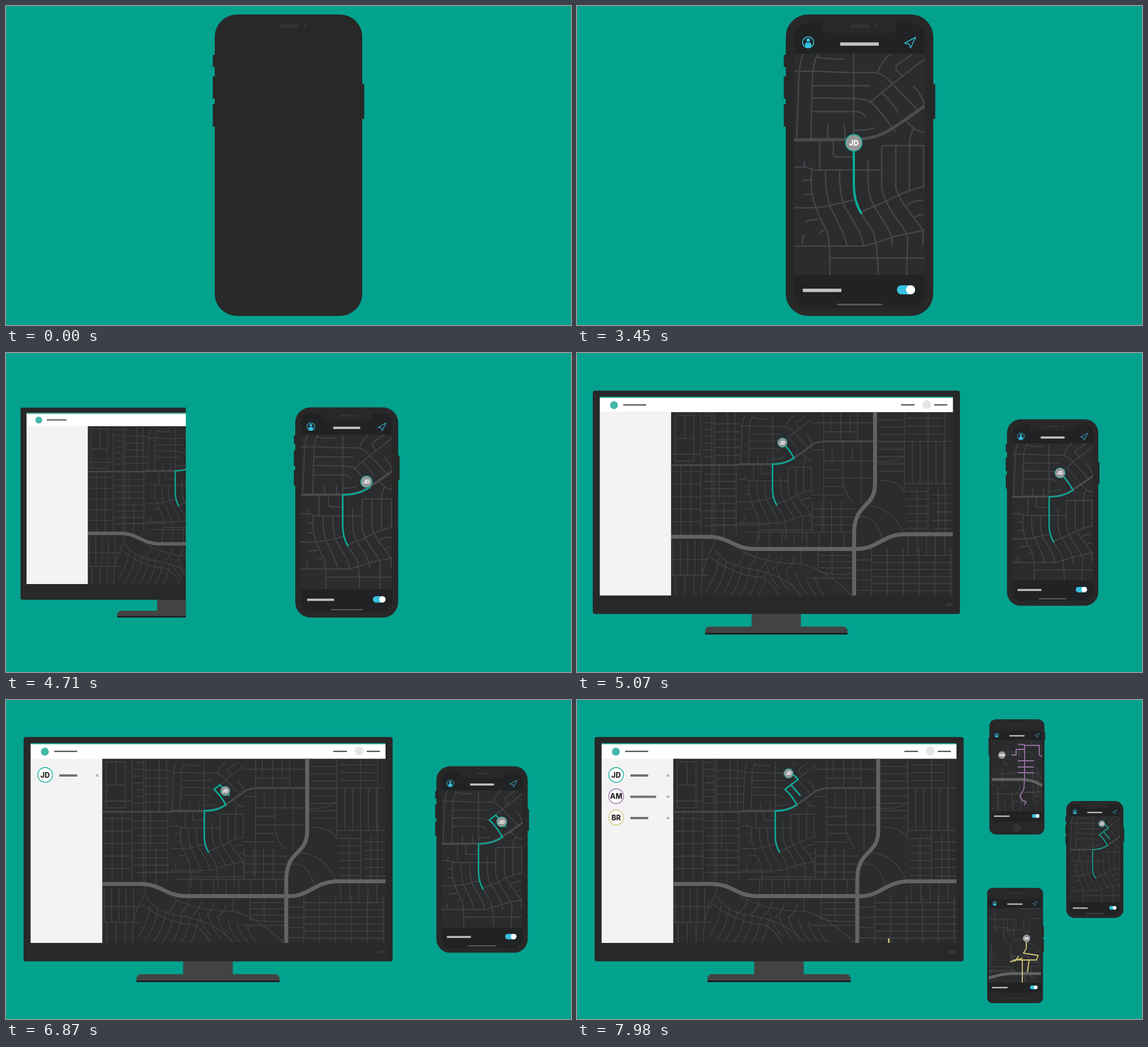
An HTML page with a canvas for the animation above (8 s loop, 996 px wide and 562 px high).

```html
<!DOCTYPE html>
<html lang="en">
<head>
<meta charset="utf-8">
<title>Live route sharing</title>
<style>
html, body { margin: 0; width: 100%; height: 100%; overflow: hidden; background: #03a28f; }
canvas { display: block; width: 100%; height: 100%; }
</style>
</head>
<body>
<canvas id="stage" width="996" height="562"></canvas>
<script>
const ctx = document.getElementById('stage').getContext('2d');
const LOOP = 8000;
const C = {
  bg: '#03a28f', body: '#282828', panel: '#212224', map: '#2b2c2e', road: '#444648',
  major: '#636363', teal: '#0bab98', cyan: '#35c0de', bar: '#bfbfbf', pin: '#979797',
  purple: '#95709f', yellow: '#d0c571'
};

// ---------- timing ----------
const clamp = v => Math.max(0, Math.min(1, v));
const span = (t, a, b) => clamp((t - a) / (b - a));
const inOut = u => u < .5 ? 4 * u ** 3 : 1 - 4 * (1 - u) ** 3;
const out = u => 1 - (1 - u) ** 3;
const mix = (a, b, u) => a + (b - a) * u;

// Monotone cubic interpolation through [time, value] pairs
function follow(keys, t) {
  const last = keys.length - 1;
  if (t <= keys[0][0]) return keys[0][1];
  if (t >= keys[last][0]) return keys[last][1];
  const slope = i => (keys[i + 1][1] - keys[i][1]) / (keys[i + 1][0] - keys[i][0]);
  const tangent = i => {
    if (i === 0 || i === last) return 0;
    const a = slope(i - 1), b = slope(i);
    return a * b <= 0 ? 0 : 2 * a * b / (a + b);
  };
  let i = 0;
  while (t > keys[i + 1][0]) i++;
  const [t0, v0] = keys[i], [t1, v1] = keys[i + 1];
  const h = t1 - t0, u = (t - t0) / h, w = 1 - u;
  return v0 * (1 + 2 * u) * w * w + tangent(i) * h * u * w * w
    + v1 * u * u * (3 - 2 * u) - tangent(i + 1) * h * u * u * w;
}

// ---------- route ----------
const legs = ['M501 365C492 350 488 335 488 316', 'L488 236', 'C520 236 538 229 556 217',
  'Q542 190 519 168', 'L537 154', 'L566 187', 'L537 154', 'L560 137', 'Q548 120 530 118'];
function svgPath(d) {
  const p = document.createElementNS('http://www.w3.org/2000/svg', 'path');
  p.setAttribute('d', d);
  return p;
}
const track = svgPath(legs.join(''));
const route = new Path2D(legs.join(''));
const after = n => svgPath(legs.slice(0, n).join('')).getTotalLength();
const travel = [[2130, 0], [2910, after(1)], [3450, after(2) - 5], [3720, after(2) + 4],
  [4610, after(3)], [4710, after(3) + 16], [5070, after(4)], [5355, after(5)],
  [6000, after(6)], [6630, after(6)], [6870, after(6) + 18], [7980, after(9)]];

// ---------- maps ----------
const north = 'M399 84Q392 100 391 130L387 236M425 84Q416 100 415 125L412 236M423 90Q440 94 471 93' +
  'M382 115H430Q470 118 522 117Q540 118 556 137L603 186M488 84V236M417 140.5H515' +
  'M415 162L490 163Q505 163 518 169Q540 190 560 221M519 168L556 137L615 92' +
  'M413 186H490Q505 187 509 195M488 219Q510 220 523 215M530 117Q535 100 553 84' +
  'M538 153Q560 175 566 187M594 142Q605 153 613 173M592 84Q575 97 562 105Q562 115 575 124' +
  'M580 203L595 217Q605 222 613 222M442 210V234M470 209Q474 215 472 234';
const middle = 'M428 238V289M452 238V260Q452 266 460 266H488M382 284Q405 282 418 289H538M401 274V283' +
  'M414 289Q410 320 418 345Q425 370 440 395Q446 410 446 474M438 289Q437 325 445 350L464 390Q472 405 476 422' +
  'M463 289Q462 325 470 350L495 392Q502 405 505 422M488 236V316Q488 340 500 363L520 395Q530 410 531 474' +
  'M513 272V310Q514 335 522 350L546 388Q556 405 556 421';
const south = 'M537 289V250Q537 246 545 246H613M537 289V320Q540 340 560 370Q580 395 583 410L581 474' +
  'M562 246V320Q565 333 580 355L605 388Q613 400 609 421M595 216Q586 225 586 246V325M611 246V318' +
  'M399 307H414M400 332H416M382 355Q410 357 440 353L491 341M500 363L545 344Q585 323 613 318' +
  'M404 380Q410 376 425 376M398 420Q396 408 401 404M428 399L436 395' +
  'M382 423H505Q520 420 560 406L613 395M446 444H613M581 351Q595 341 610 343M596 372Q605 366 610 368';
const town = new Path2D(north + middle + south);
const avenue = new Path2D('M382 236L495 235C540 232 555 215 575 203L613 176');

const rows = (x1, x2, y, step, n) =>
  Array.from({ length: n }, (_, i) => `M${x1} ${y + i * step}H${x2}`).join('');
const cols = (y1, y2, x, step, n) =>
  Array.from({ length: n }, (_, i) => `M${x + i * step} ${y1}V${y2}`).join('');
const fan = (x, y, dx, dy, bx, by, n) =>
  Array.from({ length: n }, (_, i) => `M${x + i * dx} ${y + i * dy}q${bx * .15} ${by * .55} ${bx} ${by}`).join('');

const west = 'M170 197H349M222 104V325M246 104V330Q246 340 235 360Q222 385 223 428M242 104V322' +
  'M177 109H210V190H177ZM177 150H210M194 109V150M172 178H222' +
  rows(172, 222, 209, 22, 5) + cols(197, 324, 187, 18, 2) + rows(226, 240, 110, 12, 7) +
  rows(227, 286, 213, 13, 8) + rows(246, 290, 124, 14, 5) + cols(104, 197, 270, 13, 2) +
  cols(197, 318, 285, 60, 1) + cols(332, 392, 173, 13, 5) + rows(170, 238, 364, 28, 2) +
  cols(392, 428, 178, 16, 3) + 'M246 303H345M255 197V260M264 260V324';
const foot = 'M246 345Q262 372 300 379Q370 388 400 428M240 360Q280 392 330 396Q350 405 360 428' +
  'M288 345Q330 372 400 372Q440 380 490 428M400 347V372M430 347V385Q450 392 490 390' +
  fan(254, 362, 14, 4, -22, 56, 7) + fan(340, 375, 17, 4, 22, 40, 6) + fan(300, 352, 22, 2, -16, 24, 5) +
  cols(316, 345, 322, 22, 8) + 'M300 316H490M415 397H494M455 347V390' + rows(432, 490, 357, 11, 3);
const centre = 'M419 170H440V250H419M440 155V310M440 190H531M474 155V220Q474 240 490 262M506 155V265' +
  rows(440, 474, 205, 15, 4) + rows(420, 495, 275, 14, 3) + cols(262, 316, 420, 17, 4) +
  'M440 104V154M470 104V155M500 104V155M420 122H531M440 138H500' + cols(104, 138, 452, 35, 2) +
  'M474 220H525M513 268Q560 270 583 320M500 290Q530 280 545 330' + cols(165, 190, 455, 36, 2);
const east = 'M531 155H669M583 104V245M583 230H669M625 104V318M655 104V318' +
  rows(537, 583, 117, 13, 8) + cols(155, 230, 597, 14, 5) + rows(590, 650, 114, 14, 3) +
  rows(587, 625, 244, 13, 6) + rows(632, 669, 250, 15, 5) + cols(240, 318, 605, 38, 2) +
  'M541 224Q575 225 583 245M531 190Q560 195 583 180' + rows(525, 669, 357, 12.5, 6) +
  cols(345, 428, 525, 28, 6) + cols(324, 357, 590, 16, 5) + rows(497, 525, 365, 18, 4);
const city = new Path2D(west + foot + centre + east);
const link = new Path2D('M170 197H290M417 162Q430 155 448 155H531');
const highways = new Path2D('M170 324H235C275 324 280 345.5 318 345.5H500C535 345.5 545 319.5 585 319.5H669' +
  'M531 104V230C531 275 494 262 494 318V428');

function random(seed) {
  return () => (seed = (seed * 16807) % 2147483647) / 2147483647;
}
function blocks(seed, x, y, w, h) {
  const rnd = random(seed);
  let d = '';
  for (let i = 0; i < 30; i++) {
    const px = x + rnd() * w, py = y + rnd() * h, len = 14 + rnd() * 34;
    d += i % 2 ? `M${px} ${py}h${len}q4 1 5 7` : `M${px} ${py}v${len}q1 4 7 5`;
  }
  return new Path2D(d);
}

// ---------- drawing helpers ----------
function group(draw, x = 0, y = 0, s = 1, ox = 0, oy = 0) {
  ctx.save();
  ctx.translate(x, y);
  ctx.scale(s, s);
  ctx.translate(-ox, -oy);
  draw();
  ctx.restore();
}
function box(x1, y1, x2, y2, fill, r = 0) {
  ctx.beginPath();
  ctx.roundRect(x1, y1, x2 - x1, y2 - y1, r);
  ctx.fillStyle = fill;
  ctx.fill();
}
function disc(x, y, r, fill, stroke, width) {
  ctx.beginPath();
  ctx.arc(x, y, r, 0, Math.PI * 2);
  if (fill) { ctx.fillStyle = fill; ctx.fill(); }
  if (stroke) { ctx.strokeStyle = stroke; ctx.lineWidth = width; ctx.stroke(); }
}
function line(path, color, width) {
  ctx.strokeStyle = color;
  ctx.lineWidth = width;
  ctx.stroke(path);
}
function clipBox(x1, y1, x2, y2, r = 0) {
  ctx.beginPath();
  ctx.roundRect(x1, y1, x2 - x1, y2 - y1, r);
  ctx.clip();
}
function label(text, x, y, size, color) {
  ctx.font = `800 ${size}px Inter, sans-serif`;
  ctx.textAlign = 'center';
  ctx.textBaseline = 'alphabetic';
  ctx.fillStyle = color;
  ctx.fillText(text, x, y + size * .364);
}
function pin(text, x, y, s, ring) {
  group(() => {
    disc(0, 0, 14.6, C.pin, ring, 1.6);
    label(text, 0, 0, 13, '#fff');
  }, x, y, s);
}

function drawRoute(t, width, pinScale) {
  const d = follow(travel, t);
  if (d > 0) {
    ctx.setLineDash([d, 9999]);
    line(route, C.teal, width);
    ctx.setLineDash([]);
  }
  const p = track.getPointAtLength(d);
  const lift = 7 * clamp(1 - d / 30);
  const pop = out(span(t, 1170, 1320));
  const wave = span(t, 1170, 1500);
  if (wave > 0 && wave < 1) {
    ctx.globalAlpha = .6 * (1 - wave);
    disc(p.x, p.y - lift, mix(10, 47, out(wave)), C.teal);
    ctx.globalAlpha = 1;
  }
  if (pop > 0) pin('JD', p.x, p.y - lift, pop * pinScale, C.teal);
}

const plane = new Path2D('M597 55L577.5 65.5L585.7 67.3L588 74Z');
function header() {
  disc(407.5, 64, 9.8, null, C.cyan, 1.6);
  disc(407.5, 60.3, 3.2, C.cyan);
  box(402, 64.5, 413, 73, C.cyan, [3, 3, 2, 2]);
  box(464, 64, 532, 70, C.bar);
  line(plane, C.cyan, 1.5);
}
function footer(on) {
  box(398, 498, 466, 504, C.bar);
  box(564, 492, 596, 508, '#55575a', 8);
  const alpha = ctx.globalAlpha;
  ctx.globalAlpha = alpha * on;
  box(564, 492, 596, 508, C.cyan, 8);
  ctx.globalAlpha = alpha;
  disc(mix(572, 588, on), 500, 8, '#fff');
}

// ---------- devices ----------
function mainPhone(t) {
  box(364.5, 86, 372, 107.5, C.body);
  box(364.5, 124, 372, 163, C.body);
  box(364.5, 173, 372, 212.5, C.body);
  box(624, 137, 631.5, 199, C.body);
  box(368, 15, 628, 546, C.body, 39);
  const lit = span(t, 60, 540);
  if (lit > 0) {
    ctx.save();
    ctx.globalAlpha = lit;
    clipBox(382.5, 29.5, 613, 532, 26);
    box(382, 29, 614, 533, C.panel);
    box(382, 84, 614, 474, C.map);
    ctx.save();
    clipBox(382, 84, 614, 474);
    line(town, C.road, 2.5);
    line(avenue, '#4a4c4e', 5.5);
    drawRoute(t, 4, 1);
    ctx.restore();
    header();
    footer(inOut(span(t, 910, 1020)));
    box(457.5, 524.5, 538.5, 527.5, '#58595a', 1.5);
    box(433, 20, 562, 48, C.body, 10);
    ctx.restore();
  }
  box(481, 33, 516, 38.5, '#333', 2.7);
  disc(527, 36, 3, '#333');
}

function person(name, y, color, width, t, start) {
  const p = out(span(t, start, start + 210));
  if (!p) return;
  ctx.save();
  ctx.globalAlpha = p;
  ctx.translate(-7 * (1 - p), 0);
  disc(69, y, 13, '#fff', color, 1.3);
  label(name, 69, y, 12.5, '#232323');
  box(94, y - 1, 94 + width, y + 3, '#707070');
  box(158, y - 1, 163, y + 3, '#b9b9b9');
  ctx.restore();
}

function monitor(t) {
  box(312.3, 458, 399.7, 486, '#434343');
  box(230, 483, 482.3, 497, '#434343', [8, 8, 0, 0]);
  box(230, 494, 482.3, 497, '#1d1d1d');
  box(31, 65.3, 681.5, 460.5, C.body, 4);
  box(655, 441, 669, 446.5, '#353535', 2.5);
  box(43.4, 76, 669, 104, '#fff');
  box(43.4, 76, 669, 78, '#2ba999');
  box(43.4, 103.5, 170, 428, '#f3f3f3');
  disc(68.5, 91, 7, '#43b8a9');
  box(85, 89.5, 125.5, 91.5, '#393a3b');
  box(577, 89.5, 601, 91.5, '#393a3b');
  disc(622.7, 90, 7.7, '#e5e5e5');
  box(636, 89.5, 659, 91.5, '#393a3b');
  person('JD', 132, C.teal, 31.5, t, 6630);
  person('AM', 169.5, C.purple, 45.5, t, 7480);
  person('BR', 207, C.yellow, 31.5, t, 7660);

  ctx.save();
  clipBox(169.7, 103.5, 669, 428);
  box(169, 103, 670, 429, C.map);
  line(city, '#414345', 1.4);
  line(link, '#47494b', 3);
  const local = draw => group(draw, 349.5, 195.4, .56, 488, 236);
  local(() => {
    line(town, '#414345', 2.5);
    line(avenue, '#47494b', 5.5);
  });
  line(highways, C.major, 7);
  const peek = span(t, 7800, 7950);
  if (peek > 0) line(new Path2D(`M549.5 429V${mix(429, 421, peek)}`), C.yellow, 2.6);
  local(() => drawRoute(t, 4.8, 1.02));
  ctx.restore();
}

// Small handset with a flat screen, given by its outer and screen rectangles
function handset(o) {
  const [x1, y1, x2, y2] = o.screen, mid = (x1 + x2) / 2;
  o.keys.forEach(k => box(...k, C.body));
  box(...o.shell, C.body, o.radius);
  box(x1, y1, x2, y2, C.panel);
  ctx.save();
  clipBox(x1, y1 + 16.5, x2, y2 - 18);
  box(x1, y1, x2, y2, C.map);
  line(o.streets, C.road, 1.1);
  line(o.highway, C.major, 5);
  line(o.trail, o.color, 1.9);
  pin(o.name, ...o.at, .42, '#b9b4bb');
  ctx.restore();
  group(header, mid, y1 + 8.5, .395, 498, 65.5);
  group(() => footer(1), mid, y2 - 9.5, .405, 498, 500.5);
}

const phoneA = {
  shell: [727, 34, 824, 237], screen: [731, 54, 820, 214], radius: 12,
  keys: [[725.5, 66, 730, 98], [820, 56, 825.5, 70]],
  streets: blocks(71, 722, 64, 90, 120),
  highway: new Path2D('M731 140H788Q808 142 820 151'),
  trail: new Path2D('M778 78L789 79V137L788 156L781 170L785 177L792 179L789 184M767 97H774V87H789' +
    'M789 80H815V97L820 100M778 107H805M778 118H805M778 128H805'),
  color: C.purple, name: 'AM', at: [749, 97]
};
const phoneB = {
  shell: [723, 331, 821.5, 534], screen: [726, 350.5, 818, 516], radius: 9,
  keys: [[818, 398, 823, 418], [818, 421, 823, 444]],
  streets: blocks(508, 718, 360, 92, 125),
  highway: new Path2D('M726 490Q745 483 765 482H818'),
  trail: new Path2D('M792 426V438L787 446L813 450L810 458H770M764 461L785 455M785 458V499' +
    'M797 459L794 479M778 452L772 460'),
  color: C.yellow, name: 'BR', at: [792.5, 420]
};

function popIn(u, x, y, draw) {
  if (!u) return;
  ctx.save();
  ctx.globalAlpha = u;
  group(draw, x, y, mix(.6, 1, u), x, y);
  ctx.restore();
}

function render(t) {
  ctx.lineCap = ctx.lineJoin = 'round';
  ctx.fillStyle = C.bg;
  ctx.fillRect(0, 0, 996, 562);

  if (t >= 4560) {
    const scale = 1 - .145 * Math.exp(-.0094 * (t - 4710));
    const left = 25.4 + 5.6 * span(t, 4560, 5340) ** 2;
    ctx.save();
    ctx.beginPath();
    ctx.rect(0, 0, t < 4920 ? 25 + (t - 4560) * 1.933 : 996, 562);
    ctx.clip();
    group(() => monitor(t), left, 281, scale, 31, 281);
    ctx.restore();
  }

  popIn(out(span(t, 7470, 7800)), 775.5, 135.5, () => {
    handset(phoneA);
    box(767, 43, 784, 45, '#333', 1);
    disc(775.5, 225, 7.5, '#343434');
  });
  popIn(out(span(t, 7620, 7950)), 772, 432.5, () => {
    handset(phoneB);
    box(754, 338.5, 790, 341.5, '#303030', 1.5);
    box(754, 524.5, 790, 527.5, '#303030', 1.5);
  });

  const aside = inOut(span(t, 4405, 5130)), shrink = inOut(span(t, 4460, 4860));
  const park = inOut(span(t, 7350, 7900));
  const x = mix(mix(498, 839.2, aside), 912.8, park);
  const s = mix(mix(1, .619, shrink), .388, park);
  group(() => mainPhone(t), x, mix(280.5, 281, Math.max(shrink, park)), s, 498, 280.5);
}

const begin = performance.now();
function frame() {
  render((performance.now() - begin) % LOOP);
  requestAnimationFrame(frame);
}
frame();
</script>
</body>
</html>
```
